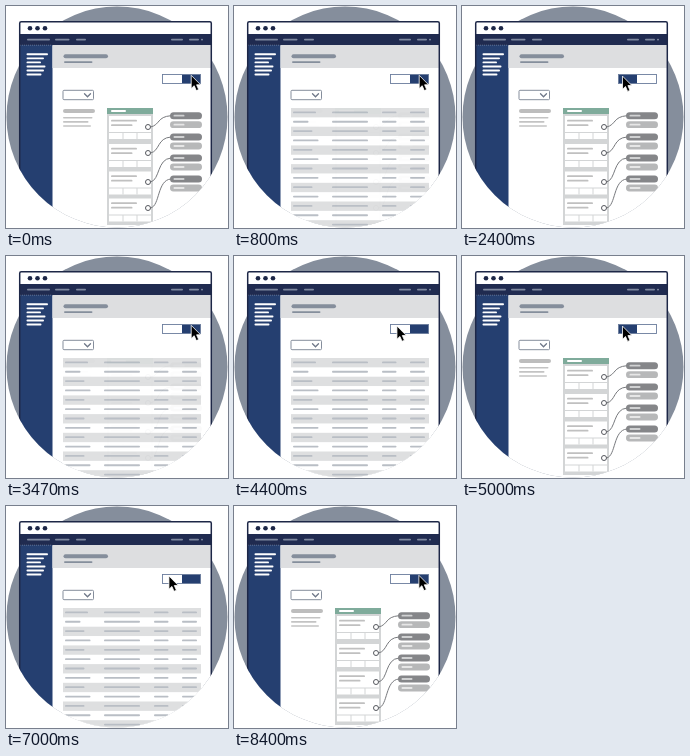
These frames come from a looping animation (222 by 222 pixels, 8470 ms). An HTML page:

```html
<!DOCTYPE html>
<html lang="en">
<head>
<meta charset="utf-8">
<title>View switch</title>
<style>
  html, body { margin: 0; width: 100%; height: 100%; overflow: hidden; background: #fff; }
  svg { display: block; width: 100vw; height: 100vh; }
  .line { fill: none; stroke-linecap: round; }
</style>
</head>
<body>
<svg viewBox="0 0 222 222">
  <defs>
    <clipPath id="cut">
      <path d="M0 0H222V111H221.5A110.5 110.5 0 0 1 .5 111H0Z"/>
    </clipPath>
  </defs>
  <circle cx="111" cy="111" r="110.5" fill="#858e9c"/>
  <g clip-path="url(#cut)">
    <rect x="13.7" y="15.7" width="191.6" height="220" rx="1.5" fill="#fff"/>
    <rect x="14" y="28" width="191" height="11.5" fill="#202b50"/>
    <rect x="14" y="39" width="32.5" height="190" fill="#253f70"/>
    <rect x="46.5" y="39" width="158.5" height="23" fill="#dddee0"/>
    <path d="M14 39.2H46" stroke="#8792aa" stroke-width=".6" stroke-dasharray="1 1"/>
    <g fill="#1d2747">
      <circle cx="24" cy="22.3" r="2.3"/><circle cx="31.5" cy="22.3" r="2.3"/><circle cx="39" cy="22.3" r="2.3"/>
    </g>
    <g id="chrome"></g>
    <rect x="57" y="84.3" width="30.5" height="9.4" rx="1" fill="#fff" stroke="#858e9c"/>
    <path class="line" d="M78.5 87.8L81.5 90.8L84.5 87.8" stroke="#6f7889" stroke-width="1.3"/>
    <g id="diagram">
      <rect x="101" y="102" width="46" height="117" fill="#d3d5d6"/>
      <rect x="101" y="102" width="46" height="6" fill="#7fab9b"/>
    </g>
    <g id="table"><rect x="56" y="100" width="141" height="122" fill="#fff"/></g>
    <rect x="13.7" y="15.7" width="191.6" height="220" rx="1.5" fill="none" stroke="#1d2747" stroke-width="1.5"/>
    <rect x="156.5" y="68.5" width="38" height="9" fill="#fff"/>
    <rect id="knob" x="176" y="68.5" width="18.5" height="9" fill="#253f70"/>
    <rect x="156.5" y="68.5" width="38" height="9" fill="none" stroke="#6c7d9d" stroke-width=".9"/>
  </g>
  <path id="cursor" d="M0 0V13.2L3 10.4L5.1 15.3L7.5 14.3L5.4 9.5H9.4Z" fill="#000" stroke="#fff" stroke-width=".8"/>
</svg>
<script>
const $ = id => document.getElementById(id);

function add(parent, tag, attrs) {
  const node = document.createElementNS('http://www.w3.org/2000/svg', tag);
  for (const key in attrs) node.setAttribute(key, attrs[key]);
  return parent.appendChild(node);
}

// Horizontal stroke with round ends, x1 and x2 being its outer limits
function dash(parent, x1, x2, y, width, stroke) {
  const r = width / 2;
  add(parent, 'path', { class: 'line', d: `M${x1 + r} ${y}H${x2 - r}`, stroke, 'stroke-width': width });
}

const chrome = $('chrome'), diagram = $('diagram'), table = $('table');

[[21, 44], [49, 63.5], [70, 80], [165, 177], [183, 193], [195, 197]]
  .forEach(([a, b]) => dash(chrome, a, b, 33.6, 1.8, '#7f899f'));
[42, 38, 35, 39.5, 38, 35.5].forEach((end, i) => dash(chrome, 20.5, end, 48.3 + i * 4.05, 1.9, '#fff'));
dash(chrome, 57.5, 102, 50.3, 4, '#858e9c');
dash(chrome, 58, 86.5, 56.1, 1.9, '#858e9c');
dash(chrome, 60.5, 74.5, 89, 1.9, '#858e9c');

dash(diagram, 57, 89, 105, 4, '#bdbdbd');
[86.5, 82.5, 85].forEach((end, i) => dash(diagram, 57, end, 111.8 + i * 4.1, 1.6, '#c3c3c3'));
dash(diagram, 105, 120, 105, 1.8, '#fff');

[[110, 121, 109.7], [138, 147, 131], [165.5, 176, 152], [192.5, 202, 173]].forEach(([top, port, pill]) => {
  add(diagram, 'rect', { x: 103, y: top, width: 42, height: 23, fill: '#fff' });
  dash(diagram, 105, 131, top + 4.7, 1.8, '#c0c0c0');
  dash(diagram, 105, 126.5, top + 9.2, 1.8, '#c0c0c0');
  add(diagram, 'path', {
    d: `M103 ${top + 16.5}H145M117 ${top + 16.5}v6.5M131 ${top + 16.5}v6.5`,
    fill: 'none', stroke: '#d3d5d6'
  });
  add(diagram, 'path', {
    d: `M144.5 ${port}C154 ${port - 2} 151 ${pill + 1} 165 ${pill}`,
    fill: 'none', stroke: '#77797d', 'stroke-width': 1
  });
  add(diagram, 'circle', { cx: 142, cy: port, r: 2.5, fill: '#fff', stroke: '#55585e', 'stroke-width': 1 });
  dash(diagram, 164, 196, pill, 7, '#858689');
  dash(diagram, 167.5, 178.5, pill, 1.8, '#d0d1d2');
  dash(diagram, 164, 196, pill + 9, 6.8, '#b7b8b9');
  dash(diagram, 167.5, 178.5, pill + 9, 1.8, '#e6e6e6');
});

for (let row = 0; row < 13; row++) {
  const top = 102 + row * 9.35, y = top + 4.4;
  if (row % 2 === 0) add(table, 'rect', { x: 57, y: top, width: 138, height: 9.35, fill: '#dedfe0' });
  const first = row === 0 ? 82 : row === 1 ? 74.5 : row % 2 ? 84.5 : 78.5;
  [[59, first], [98, 134], [148, 162.5], [176, 191]]
    .forEach(([a, b]) => dash(table, a, b, y, 1.8, '#b9bec5'));
}

const LOOP = 8470, STEP = 1000 / 15, CYCLE = 39;
const ramp = (n, start, length) => Math.min(1, Math.max(0, (n - start) / length));
const glide = p => (1 - Math.cos(Math.PI * p)) / 2;
const settle = p => 1 - (1 - p) ** 2;

function draw(time) {
  const n = Math.floor((time % LOOP + 4) / STEP);
  let left = 0, rows = settle(ramp(n, 7, 6)), knobLeft = false;
  if (n >= 16) {
    // Each round: move left, show the diagram, move right, show the table
    const k = (n - 16) % CYCLE, lastRound = n - k + 33 > 126;
    left = glide(ramp(k, 0, 14)) - glide(ramp(k, 19, 14));
    rows = 1 - settle(ramp(k, 13, 4)) + (lastRound ? 0 : settle(ramp(k, 32, 5)));
    knobLeft = k >= 13 && k < 32;
  }
  table.setAttribute('opacity', rows);
  diagram.setAttribute('opacity', rows >= 1 ? 0 : 1);
  $('knob').setAttribute('x', knobLeft ? 156.5 : 176);
  $('cursor').setAttribute('transform', `translate(${185.2 - 25 * left} ${69.3 + .8 * left})`);
}

const begin = performance.now();
function tick() {
  draw(performance.now() - begin);
  requestAnimationFrame(tick);
}
tick();
</script>
</body>
</html>
```
